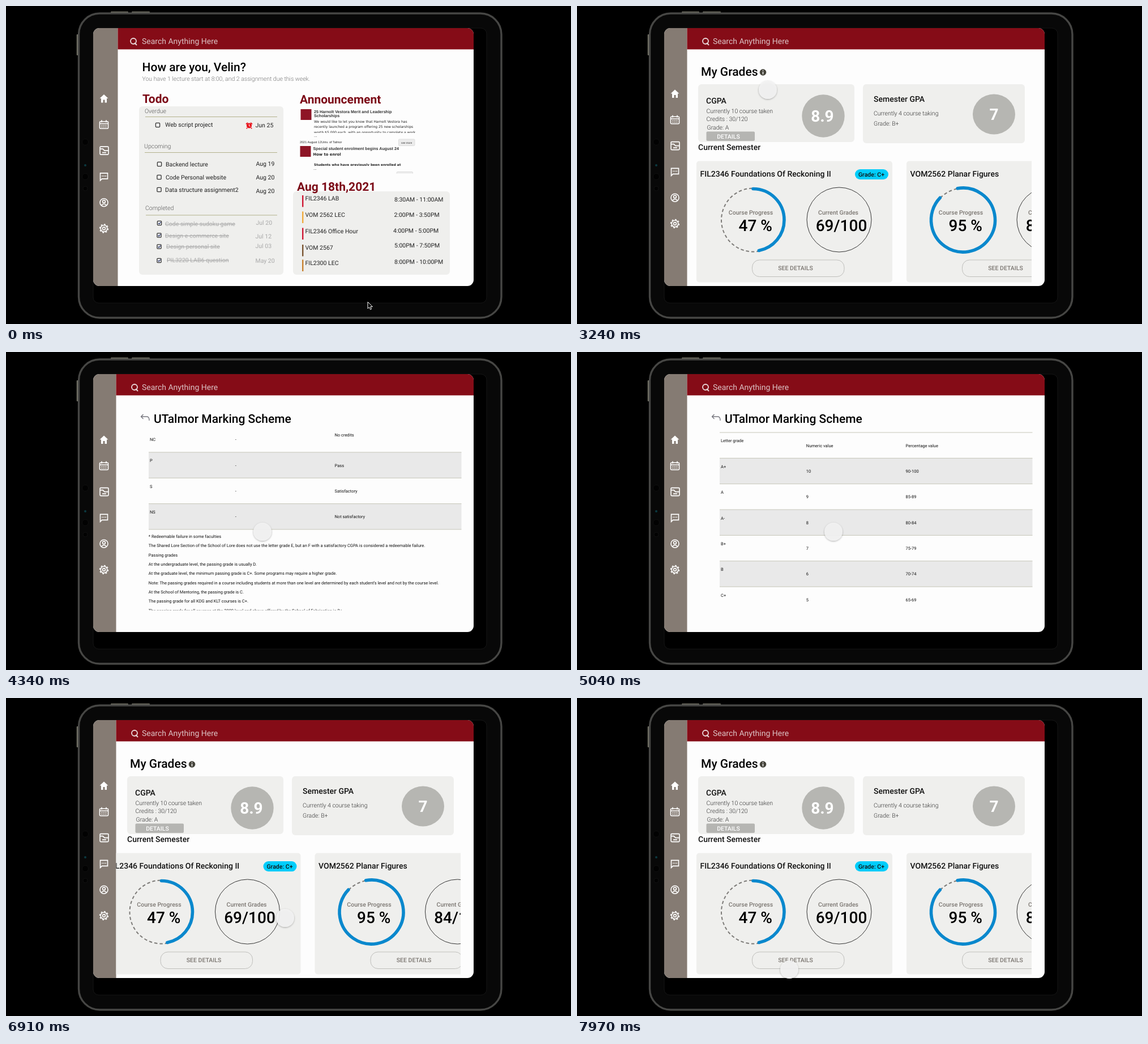
Animation of 998x561 px, one loop 8000 ms. Source, as an HTML page:

```html
<!DOCTYPE html>
<html lang="en">
<head>
<meta charset="utf-8">
<title>Student planner on a tablet</title>
<style>
html, body { margin: 0; width: 100%; height: 100%; overflow: hidden; background: #000; }
svg { display: block; width: 100vw; height: 100vh; }
text { font-family: Roboto, sans-serif; text-rendering: geometricPrecision; white-space: pre; }
.arial { font-family: "Liberation Sans", Arial, sans-serif; }
.deja { font-family: "DejaVu Sans", sans-serif; }
.done { text-decoration: line-through; }
.icon { fill: none; stroke: #fff; stroke-width: 1.6; }
</style>
</head>
<body>
<svg id="stage" viewBox="0 0 998 561" xmlns="http://www.w3.org/2000/svg"></svg>
<script>
const LOOP = 8000;
const RED = '#7c0a17', CARD = '#efefed', GREY = '#7b7671';

// y is the middle of the capital letters
const text = (x, y, size, str, fill = '#111', weight = 400, extra = '') =>
  `<text x="${x}" y="${(y + size * .355).toFixed(2)}" font-size="${size}" fill="${fill}" font-weight="${weight}" ${extra}>${str}</text>`;
const rect = (x, y, w, h, fill, r = 0, extra = '') =>
  `<rect x="${x}" y="${y}" width="${w}" height="${h}" rx="${r}" fill="${fill}" ${extra}/>`;
const circle = (x, y, r, extra = '') => `<circle cx="${x}" cy="${y}" r="${r}" ${extra}/>`;
const path = (d, extra = '') => `<path d="${d}" ${extra}/>`;
const clip = (id, x, y, w, h, r = 0) => `<clipPath id="${id}">${rect(x, y, w, h, '#fff', r)}</clipPath>`;
const group = (body, extra = '') => `<g ${extra}>${body}</g>`;
const middle = 'text-anchor="middle"';

const dots = (y, step) => [-1, 0, 1].map(i => circle(i * step, y, .9, 'fill="#fff" stroke="none"')).join('');
const icons = [
  path('M0-7.5L-7.5-.5H-5V7H-1.5V2H1.5V7H5V-.5H7.5Z', 'fill="#fff" stroke="none"'),
  rect(-7.5, -5.5, 15, 12.5, 'none', 1.5) + path('M-4-8V-4M4-8V-4M-7-1.8H7') + dots(1.2, 3.5) + dots(4.2, 3.5),
  rect(-7, -7, 15, 14, 'none', 1.5) + path('M-7-3H-2L1 0H8M-3 3.5H4'),
  path('M-6.5-6H6.5V4H-3.5L-6.5 7Z') + dots(-1, 3),
  circle(0, 0, 7) + circle(0, -1.8, 2.4) + path('M-4.6 5a5.6 5.6 0 0 1 9.2 0'),
  circle(0, 0, 5.8) + circle(0, 0, 2.4) + circle(0, 0, 7.4, 'pathLength="80" stroke-dasharray="5 5"')
];

function shell(side, iconTop, searchX) {
  const menu = icons.map((icon, i) => group(icon, `class="icon" transform="translate(173 ${iconTop + i * 45.8})"`)).join('');
  return rect(154, 39, 672, 455, '#fdfdfd') + rect(154, 39, side - 154, 455, '#857b73') +
    rect(side, 39, 826 - side, 37.5, '#850c17') + menu +
    circle(searchX, 62, 5, 'fill="none" stroke="#ead9da" stroke-width="1.8"') +
    path(`M${searchX + 2} 65l4 4`, 'stroke="#ead9da" stroke-width="2"') +
    text(240, 62, 14, 'Search Anything Here', '#dcc3c5');
}

function todoList() {
  const check = (x, y, done) => rect(x - 3.6, y - 3.6, 7.2, 7.2, 'none', 1, 'stroke="#333" stroke-width="1.3"') +
    (done ? path(`M${x - 2} ${y}l1.6 1.7 3-3.6`, 'fill="none" stroke="#23306b" stroke-width="1.2"') : '');
  const section = (x, y, label, lineY) => text(x, y, 10.5, label, '#555', 300) +
    path(`M${x + 1} ${lineY}H479`, 'stroke="#b3b28c" stroke-width="1"');
  const item = ([cx, cy, x, y, label, dx, dy, date], done) => check(cx, cy, done) +
    text(x, y, 10.5, label, done ? '#aaa' : '#222', 400, done ? 'class="done"' : '') +
    text(dx, dy, 10.5, date, done ? '#aaa' : '#222');
  const open = [
    [268, 210, 281, 209.5, 'Web script project', 440.5, 210.5, 'Jun 25'],
    [271, 279, 282, 279.5, 'Backend lecture', 441.5, 278.5, 'Aug 19'],
    [270.5, 302, 282, 302.5, 'Code Personal website', 441.5, 302.5, 'Aug 20'],
    [270.5, 324, 281, 324.5, 'Data structure assignment2', 441.5, 326, 'Aug 20']
  ];
  const done = [
    [271, 383, 281, 384.5, 'Code simple sudoku game', 441.5, 382.5, 'Jul 20'],
    [270.5, 404.5, 281, 405, 'Design e-commerce site', 440.5, 406, 'Jul 12'],
    [270.5, 424.5, 283, 424.5, 'Design personal site', 440.5, 423.5, 'Jul 03'],
    [270.5, 449, 284, 448.5, 'PIL3220 LAB6 question', 440.5, 449.5, 'May 20']
  ];
  const alarm = circle(429.5, 211, 4.6, 'fill="#e8131d"') +
    path('M424 208.5l3-2.6M435 208.5l-3-2.6M426 215l-1.2 1.4M433 215l1.2 1.4', 'stroke="#e8131d" stroke-width="1.8"') +
    path('M429.5 208.5V211.3l2 1', 'fill="none" stroke="#fff" stroke-width="1"');
  return rect(235, 177, 255, 297, CARD, 6) + text(241, 164, 21, 'Todo', RED, 700) +
    section(245, 185.5, 'Overdue', 195.5) + section(244, 247.5, 'Upcoming', 258.5) + section(246, 356.5, 'Completed', 369) +
    open.map(i => item(i, false)).join('') + done.map(i => item(i, true)).join('') + alarm;
}

function news() {
  const arial = (x, y, size, str, fill = '#333', weight = 400) => text(x, y, size, str, fill, weight, 'class="arial"');
  const deja = (x, y, size, str, weight = 400) => text(x, y, size, str, '#222', weight, 'class="deja"');
  const badge = (x, y) => rect(x, y, 19, 19, '#8e1526');
  const more = (x, y) => rect(x, y, 28.5, 11.5, '#ececec', 1.5, 'stroke="#d4d4d4" stroke-width=".7"') +
    text(x + 14.2, y + 6, 4.6, 'see more', '#333', 400, `class="arial" ${middle}`);
  const footer = (x, y, day) => arial(x, y, 5.5, `2021 August ${day}Univ. of Talmor`, '#222');
  return badge(520.5, 182) +
    arial(544, 186, 7.2, '25 Harnolt Vestora Merit and Leadership', '#333', 700) +
    arial(544, 193, 7.2, 'Scholarships', '#333', 700) +
    deja(544, 204, 6, 'We would like to let you know that Harnolt Vestora has') +
    deja(544, 213, 6, 'recently launched a program offering 25 new scholarships') +
    deja(544, 222.5, 6, 'worth $5,000 each, with an opportunity to complete a work') +
    rect(540, 224, 190, 5, '#fdfdfd') + deja(544, 229, 6, '...') +
    footer(519, 240.5, 12) + more(693.5, 235) +
    badge(519.5, 247) + arial(542.5, 251.5, 7.2, 'Special student enrolment begins August 24', '#333', 700) +
    deja(542.5, 262, 6.8, 'How to enrol', 700) +
    deja(544, 279.7, 5.75, 'Students who have previously been enrolled at', 700) +
    rect(540, 282, 190, 4, '#fdfdfd') + deja(543, 287, 6, '...') +
    footer(517.5, 298.5, 16) + more(690, 292.5) +
    badge(522.5, 323) + arial(545.5, 327, 7.2, 'Our website is getting a makeover! Check it out', '#333', 700) +
    arial(545.5, 334, 7.2, 'now!', '#333', 700) +
    arial(545.5, 343, 5.85, 'As you can see, our website is getting a makeover. We\u2019ve made');
}

function schedule() {
  const rows = [
    [339, 'FIL2346 LAB', 686, 341, '8:30AM - 11:00AM', 334, '#cf1733'],
    [368, 'VOM 2562 LEC', 685.5, 368.5, '2:00PM - 3:50PM', 362.5, '#f0aa3c'],
    [397, 'FIL2346 Office Hour', 684, 396, '4:00PM - 5:00PM', 391.5, '#cf1733'],
    [426, 'VOM 2567', 686, 422.5, '5:00PM - 7:50PM', 421, '#7a5430'],
    [453.5, 'FIL2300 LEC', 686, 451.5, '8:00PM - 10:00PM', 447.5, '#c8812f']
  ];
  return rect(507, 327, 277, 147, CARD, 6) + text(514, 319, 21, 'Aug 18th,2021', RED, 700) +
    rows.map(([y, label, x, ty, hours, by, color]) =>
      rect(523, by, 2.4, 20.5, color) + text(528.5, y, 10.5, label, '#222') + text(x, ty, 10.5, hours, '#222')).join('');
}

const home = shell(197.5, 163.5, 225) +
  text(240.5, 107.5, 21, 'How are you, Velin?', '#000', 500) +
  text(240.5, 128, 10.5, 'You have 1 lecture start at 8:00, and 2 assignment due this week.', '#777', 300) +
  todoList() + text(519, 164.5, 21, 'Announcement', RED, 700) +
  group(group(news(), 'id="news"'), 'clip-path="url(#newsClip)"') + schedule();

function course(x, title, percent, mark, start, sweep, r, badge) {
  const ring = 'fill="none" stroke="#7d7b78" stroke-width="2" stroke-dasharray="5.5 4"';
  const arc = `fill="none" stroke="#0a88cd" stroke-width="5.6" stroke-linecap="round" pathLength="100" stroke-dasharray="${sweep} 100" transform="rotate(${start} 311 377.5)"`;
  return group(rect(211, 273.5, 346, 214, CARD, 5) + text(217.5, 296, 14, title, '#111', 500) +
    (badge ? rect(491, 288, 59, 18, '#00cdfb', 9) + text(520, 297, 10.5, badge, '#111', 500, middle) : '') +
    circle(311, 377.5, 56, ring) + circle(311, 377.5, r, arc) +
    text(307, 364, 10.5, 'Course Progress', GREY, 500, middle) + text(285.5, 387, 28, percent, '#000', 500) +
    circle(463, 377, 57, 'fill="none" stroke="#333" stroke-width="1"') +
    text(461.5, 364, 10.5, 'Current Grades', GREY, 500, middle) + text(467, 387, 28, mark, '#000', 500, middle) +
    rect(309.5, 448, 162.5, 29.5, 'none', 13, 'stroke="#b9b9b6" stroke-width=".9"') +
    text(386, 461.8, 10.5, 'SEE DETAILS', GREY, 500, middle), `transform="translate(${x} 0)"`);
}

const inner = shell(194.5, 155, 227);
const grades = inner + text(219, 116, 21, 'My Grades', '#000', 500) +
  circle(328.5, 117, 5.8, 'fill="#45443b"') + path('M328.5 116v4.4M328.5 113.2v1.6', 'stroke="#fff" stroke-width="1.5"') +
  rect(214, 138, 276, 102, CARD, 6) + text(228, 167, 14, 'CGPA', '#111', 500) +
  text(228.5, 185, 10.5, 'Currently 10 course taken', '#333', 300) +
  text(228.5, 199.5, 10.5, 'Credits : 30/120', '#333', 300) + text(229.5, 214, 10.5, 'Grade: A', '#333', 300) +
  rect(228.5, 221.5, 85.5, 16.5, '#b5b5b2', 2) + text(267.5, 230, 10.5, 'DETAILS', '#fff', 500, middle) +
  circle(435, 194, 37.7, 'fill="#b6b6b2"') + text(433.5, 194.5, 28, '8.9', '#fff', 700, middle) +
  rect(505, 138, 286, 104, CARD, 6) + text(524, 164, 14, 'Semester GPA', '#111', 500) +
  text(524, 189, 10.5, 'Currently 4 course taking', '#333', 300) + text(524, 207.5, 10.5, 'Grade: B+', '#333', 300) +
  '<ellipse cx="736.5" cy="191" rx="37.5" ry="35.5" fill="#b6b6b2"/>' + text(736.5, 191, 28, '7', '#fff', 700, middle) +
  text(214, 249.5, 14, 'Current Semester', '#111', 500) +
  group(group(course(0, 'FIL2346 Foundations Of Reckoning II', '47 %', '69/100', -90, 47, 55, 'Grade: C+') +
    course(371, 'VOM2562 Planar Figures', '95 %', '84/100', -100, 90, 56.5), 'id="courses"'), 'clip-path="url(#courseClip)"');

function gradeTable() {
  const top = 142, step = 45.35, size = 7.5;
  const letters = 'A+ A A- B+ B C+ C D+ D E* F ABS EIN DFR CR NC P S NS'.split(' ');
  const ranges = ['90-100', '85-89', '80-84', '75-79', '70-74', '65-69', '60-64', '55-59', '50-54', '40-49', '0-39',
    'Absent', 'Incomplete', 'Deferred', 'Credits', 'No credits', 'Pass', 'Satisfactory', 'Not satisfactory'];
  const rows = [['Letter grade', 'Numeric value', 'Percentage value'],
    ...letters.map((l, i) => [l, i < 13 ? Math.max(0, 10 - i) : '-', ranges[i]])];
  const notes = ['* Redeemable failure in some faculties',
    'The Shared Lore Section of the School of Lore does not use the letter grade E, but an F with a satisfactory CGPA is considered a redeemable failure.',
    'Passing grades',
    'At the undergraduate level, the passing grade is usually D.',
    'At the graduate level, the minimum passing grade is C+. Some programs may require a higher grade.',
    'Note: The passing grades required in a course including students at more than one level are determined by each student\u2019s level and not by the course level.',
    'At the School of Mentoring, the passing grade is C.',
    'The passing grade for all KDG and KLT courses is C+.',
    'The passing grade for all courses at the 2000 level and above offered by the School of Fabrication is D+.'];
  const end = top + rows.length * step;
  const line = y => path(`M252 ${y}H804.5`, 'stroke="#c6c6b8" stroke-width="1"');
  return rows.map(([letter, value, range], i) => {
    const y = top + i * step, swap = letter === 'NC';
    return (i % 2 ? rect(252, y, 552.5, step, '#e9e9e9') : '') + line(y) +
      text(254, y + (swap ? 23 : 14.8), size, letter) + text(404.8, y + 23, size, value) +
      text(580.5, y + (swap ? 14.8 : 23), size, range);
  }).join('') + line(end) + notes.map((n, i) => text(251.8, end + 12.5 + i * 16.3, size, n)).join('');
}

const scheme = inner +
  path('M242.5 110l-4 4 4 4M238.5 114H249q4 0 4 7', 'fill="none" stroke="#75757d" stroke-width="1.3"') +
  text(261, 117.5, 21, 'UTalmor Marking Scheme', '#000', 500) +
  group(group(gradeTable(), 'id="table"'), 'clip-path="url(#tableClip)"');

const device = rect(185, 9.8, 31, 4, '#77766a', 1) + rect(222, 9.8, 32, 4, '#77766a', 1) + rect(124.8, 50, 4, 37, '#77766a', 1) +
  rect(128.5, 13, 746.5, 537, '#080808', 37, 'stroke="#464644" stroke-width="3.4"') +
  rect(154, 39, 695, 485, '#000', 10, 'stroke="#151515" stroke-width="1"') +
  [240, 301, 322].map((y, i) => circle(140, y, i < 2 ? 5.5 : 4, 'fill="#020202" stroke="#101010"')).join('') +
  circle(140, 281, 2, 'fill="#0b3940"');

document.getElementById('stage').innerHTML = '<defs>' +
  clip('screenClip', 154, 39, 672, 455, 11) + clip('newsClip', 510, 176.5, 270, 119) +
  clip('courseClip', 194.5, 268, 608.5, 226) + clip('tableClip', 245, 141, 565, 314.5) +
  '<filter id="soft" x="-50%" y="-50%" width="200%" height="200%"><feDropShadow dx="0" dy="1" stdDeviation="1.6" flood-opacity=".35"/></filter></defs>' +
  rect(0, 0, 998, 561, '#000') + device +
  group(group(home, 'id="home"') + group(grades, 'id="grades"') + group(scheme, 'id="scheme"'), 'clip-path="url(#screenClip)"') +
  group(path('M0 0V11.8L2.7 9.3 4.6 13.5 6.6 12.6 4.8 8.5H8.4Z', 'fill="#000" stroke="#fff" stroke-width="1"'), 'id="arrow"') +
  group(circle(0, 0, 16, 'fill="#f3f3f3" fill-opacity=".9" filter="url(#soft)"'), 'id="touch"');

// [time, value, ...]: eased between neighbours
const pointer = [[0, 639, 522], [150, 639, 522], [750, 672, 228], [1750, 672, 228], [2250, 174, 248], [2500, 174, 254],
  [3180, 338, 152], [3240, 337, 148], [3400, 329, 119], [3520, 329, 119], [3900, 453, 317], [5080, 453, 317],
  [5550, 246, 117], [5750, 246, 117], [6250, 493, 388], [7250, 493, 388], [7850, 375, 479], [8000, 375, 479]];
const newsScroll = [[0, 0], [850, 0], [1350, 52.5], [1550, 52.5], [1800, 0], [LOOP, 0]];
const tableScroll = [[0, 0], [3920, 0], [4270, 736], [4450, 736], [4950, 0], [LOOP, 0]];
const courseScroll = [[0, 0], [6300, 0], [6550, 120], [6620, 120], [6890, 36.5], [6930, 36.5], [7120, 0], [LOOP, 0]];
const pages = [[0, 'home'], [2450, 'grades'], [3480, 'scheme'], [5700, 'grades']];

function at(track, t) {
  const i = track.findIndex(k => k[0] > t), a = track[i - 1], b = track[i];
  const p = (t - a[0]) / (b[0] - a[0]), e = p * p * (3 - 2 * p);
  return a.slice(1).map((v, j) => v + (b[j + 1] - v) * e);
}
const el = id => document.getElementById(id);
const move = (id, x, y) => el(id).setAttribute('transform', `translate(${x} ${y})`);
const show = (id, on) => el(id).setAttribute('display', on ? 'inline' : 'none');

function draw(now) {
  const t = now % LOOP;
  const page = pages.filter(p => p[0] <= t).pop()[1];
  for (const name of ['home', 'grades', 'scheme']) show(name, name === page);
  show('arrow', page === 'home');
  show('touch', page !== 'home');
  const [x, y] = at(pointer, t);
  move('arrow', x, y);
  move('touch', x, y);
  move('news', 0, -at(newsScroll, t)[0]);
  move('table', 0, -at(tableScroll, t)[0]);
  move('courses', -at(courseScroll, t)[0], 0);
  requestAnimationFrame(draw);
}
draw(performance.now());
</script>
</body>
</html>
```
